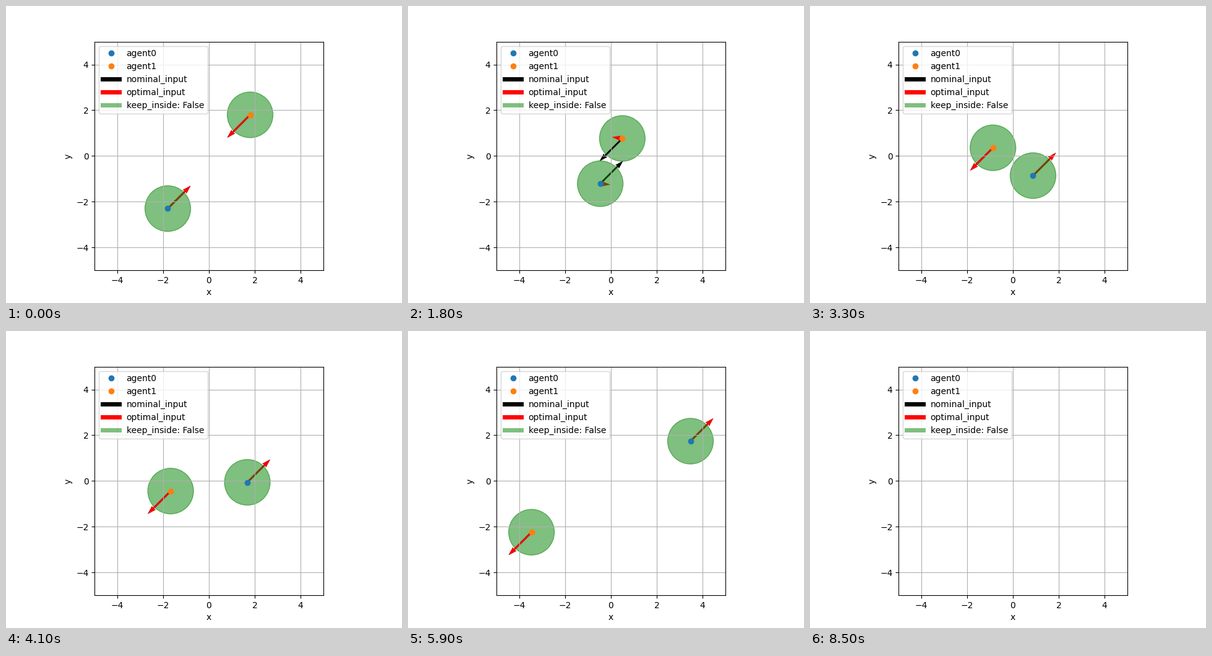
A matplotlib script that plays this animation: 640 px wide and 480 px high, repeating every 10000 ms.

```python
import numpy as np
import matplotlib.pyplot as plt
from matplotlib.animation import FuncAnimation

DT = 0.1
STEPS = 85
FRAMES = 100
SAFE_DISTANCE = 2.06
NOMINAL = np.array([[1.0, 1.0], [-1.0, -1.0]])
START = np.array([[-1.8, -2.3], [1.8, 1.8]])


def safe_input(own, other, nominal):
    """Closest input to nominal whose closing speed stays within the gap."""
    offset = other - own
    distance = np.hypot(*offset)
    toward = offset / distance
    excess = toward @ nominal - (distance - SAFE_DISTANCE)
    return nominal - max(0.0, excess) * toward


def simulate():
    positions, inputs = [START], [NOMINAL]
    pos = START.copy()
    for _ in range(STEPS):
        u = np.zeros((2, 2))
        for i in range(2):
            u[i] = safe_input(pos[i], pos[1 - i], NOMINAL[i])
            pos[i] += DT * u[i]
        positions.append(pos.copy())
        inputs.append(u)
    return positions, inputs


positions, inputs = simulate()

plt.rcParams["font.family"] = "DejaVu Sans"
fig, ax = plt.subplots(figsize=(6.4, 4.8), dpi=100)
ax.set_aspect("equal")
ax.set(xlim=(-5, 5), ylim=(-5, 5), xlabel="x", ylabel="y")
ax.grid()


def add_circle(i):
    return ax.add_patch(plt.Circle(START[i], 1.0, color="green", alpha=0.5))


def add_arrow(i, color):
    return ax.quiver(*START[i], *NOMINAL[i], color=color,
                     angles="xy", scale_units="xy", scale=1)


# The first agent's circle covers its arrows; the second agent's lies below.
circle1 = add_circle(1)
arrows = [[add_arrow(i, color) for color in ("black", "red")] for i in range(2)]
circles = [add_circle(0), circle1]
dots = [ax.plot(*START[i], "o", color=f"C{i}", label=f"agent{i}")[0]
        for i in range(2)]

for label, color, alpha in (("nominal_input", "black", 1),
                            ("optimal_input", "red", 1),
                            ("keep_inside: False", "green", 0.5)):
    ax.plot([], [], color=color, alpha=alpha, lw=5, label=label)
ax.legend(loc="upper left")


def update(frame):
    step = min(frame, STEPS)
    for i, pos in enumerate(positions[step]):
        circles[i].center = tuple(pos)
        dots[i].set_data([pos[0]], [pos[1]])
        for arrow, u in zip(arrows[i], (NOMINAL[i], inputs[step][i])):
            arrow.set_offsets([pos])
            arrow.set_UVC([u[0]], [u[1]])
    return circles + dots + arrows[0] + arrows[1]


anim = FuncAnimation(fig, update, frames=FRAMES, interval=100,
                     repeat=True, repeat_delay=0)
plt.show()
```
